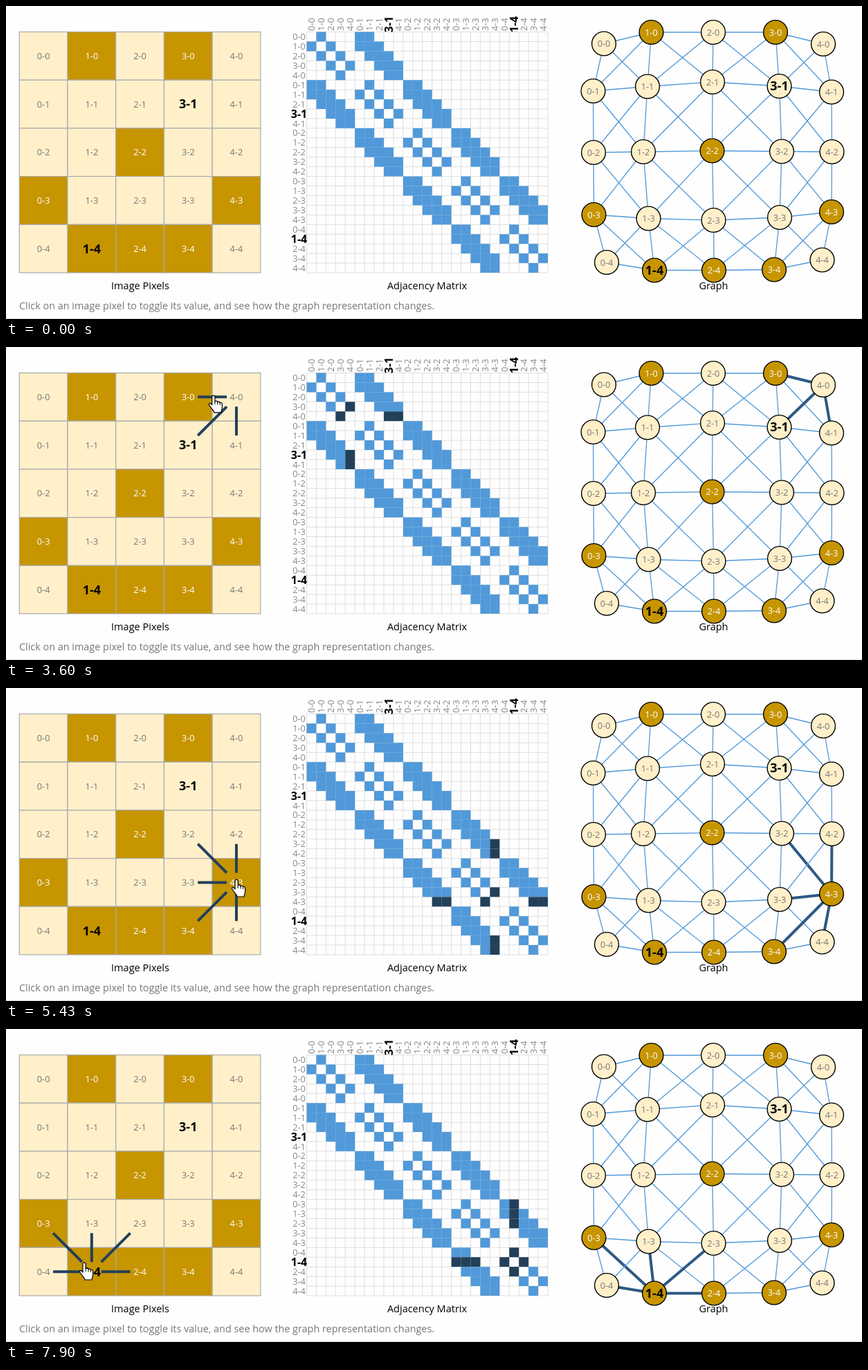
Write an HTML page that moves like this. It is 1237 px wide and 453 px high and loops after 8 s.

```html
<!DOCTYPE html>
<html lang="en">
<head>
<meta charset="utf-8">
<title>Image pixels as a graph</title>
<style>
  html, body { margin: 0; width: 100%; height: 100%; overflow: hidden; background: #fefefe; }
  svg { display: block; width: 100%; height: 100%; font-family: "Open Sans", "Noto Sans", sans-serif; }
  text { text-anchor: middle; }
</style>
</head>
<body>
<svg id="stage" viewBox="0 0 1237 453"></svg>
<script>
const LOOP = 8000, N = 5, CELL = 69.7, LEFT = 19.3, TOP = 37.5;
const UNIT = CELL / N, MATRIX_X = 434.5, SIDE = CELL * N;
const PALE = '#fff0ca', GOLD = '#c69500', BLUE = '#5199d9', DARK = '#23405a', DARK_EDGE = '#2c5a84', GREY = '#777';

const stage = document.getElementById('stage');
const golden = new Set(['1-0', '3-0', '2-2', '0-3', '4-3', '1-4', '2-4', '3-4']);

// Node centres of the graph, row by row
const layout = [
  [864, 54.5], [932.5, 38], [1022, 38], [1112, 38], [1181, 55],
  [848.5, 123], [927, 116.5], [1021, 110], [1117.5, 116], [1193, 124.5],
  [849, 212], [921, 211], [1020.5, 209.5], [1121, 210.5], [1193.5, 211],
  [849.5, 302], [928.5, 307.5], [1022.5, 310], [1118, 306], [1193, 298],
  [868, 371], [937, 382.5], [1023, 382.5], [1110, 381.5], [1179.5, 367.5]
];

// Pointer moves: start, end, steps, target x, target y
const moves = [
  [1250, 1520, 5, 48, 84], [1850, 2190, 6, 124, 76], [2520, 2850, 6, 195, 73],
  [3200, 3340, 3, 264, 71], [3530, 3880, 6, 333, 69], [4080, 4430, 6, 334, 141],
  [4760, 4960, 4, 334, 209], [5230, 5430, 4, 333, 277], [5700, 6040, 6, 325, 342],
  [6370, 6570, 4, 255, 342], [7160, 7370, 4, 185, 341], [7700, 7900, 4, 113, 338]
];
const entry = [3, 90];

function add(parent, tag, attrs, content) {
  const el = document.createElementNS('http://www.w3.org/2000/svg', tag);
  for (const key in attrs) el.setAttribute(key, attrs[key]);
  if (content) el.textContent = content;
  parent.appendChild(el);
  return el;
}
const group = attrs => add(stage, 'g', attrs);
const line = (parent, x1, y1, x2, y2, attrs) => add(parent, 'line', { x1, y1, x2, y2, ...attrs });

const nodes = layout.map(([gx, gy], i) => {
  const col = i % N, row = Math.floor(i / N), name = col + '-' + row;
  return {
    i, col, row, name, gx, gy,
    px: LEFT + (col + 0.5) * CELL, py: TOP + (row + 0.5) * CELL,
    gold: golden.has(name), strong: name === '3-1' || name === '1-4'
  };
});
const adjacent = (a, b) => a !== b && Math.abs(a.col - b.col) < 2 && Math.abs(a.row - b.row) < 2;

function label(parent, node, x, y, fill, strongSize, turn) {
  const size = node.strong ? strongSize : 12.8;
  const attrs = {
    y: size * 0.357, fill: node.strong ? '#000' : fill, 'font-size': size,
    'font-weight': node.strong ? 700 : 400,
    transform: `translate(${x} ${y}) rotate(${turn || 0})`
  };
  add(parent, 'text', attrs, node.name);
}
const nodeLabel = (parent, node, x, y) => label(parent, node, x, y, node.gold ? '#fff' : GREY, 18);

// Image pixels
const pixels = group({ stroke: '#aaa', 'stroke-width': 1.2 });
const pixelText = group();
for (const n of nodes) {
  add(pixels, 'rect', {
    x: n.px - CELL / 2, y: n.py - CELL / 2, width: CELL, height: CELL, fill: n.gold ? GOLD : PALE
  });
  nodeLabel(pixelText, n, n.px, n.py);
}
const pixelLinks = group({ stroke: DARK, 'stroke-width': 4 });

// Adjacency matrix
const rules = group({ stroke: '#dedede', 'stroke-width': 1 });
for (let k = 0; k <= N * N; k++) {
  const d = k * UNIT;
  line(rules, MATRIX_X + d, TOP, MATRIX_X + d, TOP + SIDE);
  line(rules, MATRIX_X, TOP + d, MATRIX_X + SIDE, TOP + d);
}
const matrix = group(), matrixText = group();
for (const n of nodes) {
  const d = (n.i + 0.5) * UNIT;
  label(matrixText, n, 423.5, TOP + d, '#888', 16);
  label(matrixText, n, MATRIX_X + d, 26.5, '#888', 16, -90);
}

// Graph
const edges = group(), balls = group({ stroke: '#000', 'stroke-width': 1.4 }), ballText = group();
for (const n of nodes) {
  add(balls, 'circle', { cx: n.gx, cy: n.gy, r: 17.4, fill: n.gold ? GOLD : PALE });
  nodeLabel(ballText, n, n.gx, n.gy);
}

// Every link is known to both of its ends
const cells = [], links = [], spokes = [];
for (const a of nodes) for (const b of nodes) {
  if (!adjacent(a, b)) continue;
  const cell = add(matrix, 'rect', {
    x: MATRIX_X + b.i * UNIT, y: TOP + a.i * UNIT, width: UNIT, height: UNIT
  });
  cells.push({ a, b, el: cell });
  const at = f => [a.px + (b.px - a.px) * f, a.py + (b.py - a.py) * f];
  spokes.push({ a, el: line(pixelLinks, ...at(0.2), ...at(0.8)) });
  if (a.i < b.i) links.push({ a, b, el: line(edges, a.gx, a.gy, b.gx, b.gy) });
}

// Captions
const caption = (x, y, s, attrs) => add(stage, 'text', { x, y, 'font-size': 14.5, ...attrs }, s);
caption(194, 409.5, 'Image Pixels');
caption(608.5, 409.5, 'Adjacency Matrix');
caption(1022.5, 409.5, 'Graph');
caption(19, 438.5, 'Click on an image pixel to toggle its value, and see how the graph representation changes.',
  { fill: GREY, 'font-size': 14.4, style: 'text-anchor:start' });
line(stage, 0, 452.5, 1237, 452.5, { stroke: '#ddd' });

// Hand pointer with its fingertip at the origin
const hand = group({ stroke: '#000', 'stroke-width': 1.2, 'stroke-linejoin': 'round' });
add(hand, 'path', {
  fill: '#fff',
  d: 'M-2 2.2C-2-.6 2.2-.6 2.2 2.2V9C2.8 7.6 6 7.8 6 10C6.6 8.6 9.5 9 9.5 11C10.3 9.8 12.6 10.4 12.6 12.6'
    + 'V18C12.6 21 11 22 11 25H1C1 22.5-1 21.5-3 18.5L-6.2 14C-7.4 12-4.8 10.8-3.4 12.4L-2 14Z'
});
add(hand, 'path', { fill: 'none', 'stroke-width': 1, d: 'M2.2 9V13M6 10V13.5M9.5 11V14' });

function pointerAt(t) {
  let pos = null, from = entry;
  for (const [start, end, steps, x, y] of moves) {
    if (t < start) break;
    const step = Math.floor((t - start) / (end - start) * (steps - 1) + 0.1);
    const u = Math.min(1, (step + 1) / steps);
    const e = 1 - Math.pow(1 - u, 1.8);
    pos = [from[0] + (x - from[0]) * e, from[1] + (y - from[1]) * e];
    from = [x, y];
  }
  return pos;
}

function nodeUnder([x, y]) {
  const col = Math.floor((x - LEFT) / CELL), row = Math.floor((y - TOP) / CELL);
  return col >= 0 && col < N && row >= 0 && row < N ? nodes[row * N + col] : null;
}

let shown;
function highlight(node) {
  if (node === shown) return;
  shown = node;
  for (const s of spokes) s.el.setAttribute('visibility', s.a === node ? 'visible' : 'hidden');
  for (const c of cells) c.el.setAttribute('fill', c.a === node || c.b === node ? DARK : BLUE);
  for (const l of links) {
    const on = l.a === node || l.b === node;
    l.el.setAttribute('stroke', on ? DARK_EDGE : BLUE);
    l.el.setAttribute('stroke-width', on ? 4 : 1.3);
  }
}

function draw(t) {
  const pos = pointerAt(t);
  hand.setAttribute('visibility', pos ? 'visible' : 'hidden');
  if (pos) hand.setAttribute('transform', `translate(${pos[0]} ${pos[1]})`);
  highlight(pos ? nodeUnder(pos) : null);
}

let origin;
function tick(now) {
  if (origin === undefined) origin = now;
  draw((now - origin) % LOOP);
  requestAnimationFrame(tick);
}
draw(0);
requestAnimationFrame(tick);
</script>
</body>
</html>
```
